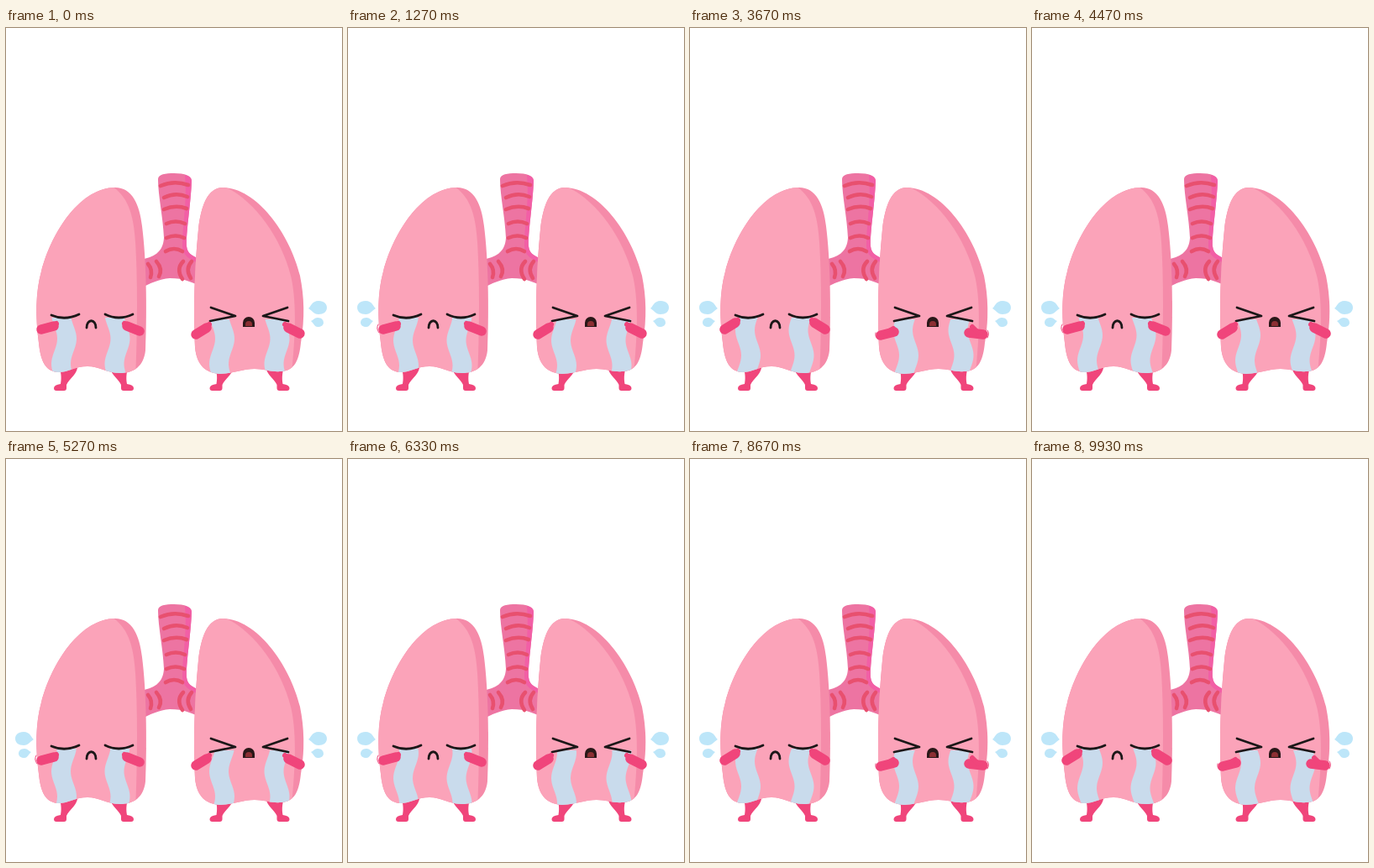
An HTML page that plays this animation: 400 px wide and 480 px high, repeating every 9990 ms.

```html
<!DOCTYPE html>
<html lang="en">
<head>
<meta charset="utf-8">
<title>Crying lungs</title>
<style>
  html, body { margin: 0; width: 100%; height: 100%; overflow: hidden; background: #fff; }
  svg { display: block; width: 100vw; height: 100vh; }
  .line { fill: none; stroke-linecap: round; stroke-linejoin: round; }
  .ink { stroke: #1c1718; stroke-width: 2.8; }
  .ring { stroke: #e8506f; stroke-width: 4.6; }
  .limb { fill: #f0457b; }
  .arm { stroke: #f0457b; stroke-width: 11.5; }
  .thumb { stroke: #f0457b; stroke-width: 6; }
  .trace { stroke: #f0457b; stroke-width: 1; }
  .tear { fill: #c9dbec; }
  .drop { fill: #bde6f9; }
</style>
</head>
<body>
<svg viewBox="0 0 400 480">
  <defs>
    <path id="lungL" d="M130 190C150 190 159 210 162 236C167 276 168 330 166 384C164 403 152 411 136 411C120 411 111 403 97 403C82 403 75 410 62 410C46 409 41 395 39 375C35 345 35 315 42 290C55 240 90 190 130 190Z"/>
    <path id="lungR" d="M258 190C240 190 232 212 229 240C224 290 223 340 225 380C227 402 238 411 255 412C272 411 282 406 296 406C308 406 315 410 328 409C344 408 349 395 351 375C356 345 355 320 350 295C338 245 298 190 258 190Z"/>
    <clipPath id="clipL"><use href="#lungL"/></clipPath>
    <clipPath id="clipR"><use href="#lungR"/></clipPath>
    <path id="leg" class="limb" d="M64 405H85C83 414 75 418 72 425V429Q72 432 69 432H60Q57 432 57 429Q57 425 65 424C66 418 66 413 64 405Z"/>
    <g id="legs"><use href="#leg"/><use href="#leg" transform="matrix(-1 0 0 1 209 0)"/></g>
    <path id="drops" class="drop" d="M360 334C363 332 364 325 372 325C379 325 382 329 382 333C382 338 378 341 372 341C366 341 364 336 360 334ZM363 349C366 348 367 345 371 345C376 345 378 348 378 351C378 354 375 356 371 356C367 356 366 351 363 349Z"/>
  </defs>

  <path fill="#ed74a2" d="M181 180C181 174 190 173 200 173C213 173 221 176 221 182C220 210 214 245 215 260C216 270 224 272 232 276V308C222 303 212 298 195 298C182 299 172 304 160 310V276C175 273 187 268 188 250C187 225 181 200 181 180Z"/>
  <path fill="#f25fa6" d="M213 175Q221 177 221 182C220 210 214 245 215 260C216 270 224 272 232 276V281C216 275 210 270 210 258C210 235 216 205 213 175Z"/>
  <path class="line ring" d="M184 188Q200 181 217 187M188 202Q202 195 216 201M188 216Q202 210 215 215M191 233Q202 228 213 233M191 250Q202 245 212 250M190 266Q200 260 210 266M169 281Q175 288 172 297M179 278Q187 287 182 296M211 278Q202 287 210 299M221 278Q213 287 220 298"/>

  <use href="#legs"/>
  <use href="#legs" x="185.5"/>

  <use href="#lungL" fill="#f58ba9"/>
  <path clip-path="url(#clipL)" fill="#fba3b9" d="M120 185C145 197 152 222 154 255Q158 320 154 420H20V185Z"/>
  <use href="#lungR" fill="#f58ba9"/>
  <path clip-path="url(#clipR)" fill="#fba3b9" d="M250 185C290 197 326 245 339 295C346 325 345 365 339 420H210V185Z"/>

  <g id="tearsL" clip-path="url(#clipL)"></g>
  <g id="tearsR" clip-path="url(#clipR)"></g>

  <path class="line ink" d="M54 342Q70 349 87 341M118 341Q134 349 151 341M96 357C96 346 107 346 107 357M244 333L273 343L243 349M335 333L306 343L336 349"/>
  <path fill="#2a1718" d="M282 356V351A7 7 0 0 1 296 351V356Z"/>
  <path fill="#8c2f33" d="M285 355V353A4 4 0 0 1 293 353V355Z"/>

  <g id="poseA">
    <path class="line arm" d="M42 359L57 355M159 361L144 355M226 365L239 357M350 364L336 357"/>
    <path class="line thumb" d="M50 357L60 352M152 358L141 352M232 360L242 353M343 360L332 353"/>
  </g>
  <g id="poseB">
    <path class="line arm" d="M41 359L54 351M161 359L148 351M227 366L243 362M349 365L332 363"/>
    <path class="line thumb" d="M48 355L57 348M154 355L145 348M233 363L242 358M343 363L336 356"/>
  </g>
  <path id="traceA" class="line trace" d="M36 353Q33 358 37 363"/>
  <path id="traceB" class="line trace" d="M221 363Q220 370 225 371M354 360Q357 364 354 369"/>

  <use href="#drops"/>
  <use id="dropsL" href="#drops" transform="matrix(-1 0 0 1 393 0)"/>
</svg>
<script>
const LOOP = 9990, STEP = 66.6, FPS = 15;
const byId = id => document.getElementById(id);
const show = (id, on) => byId(id).style.display = on ? '' : 'none';

function addTear(group, x, top) {
  const path = document.createElementNS('http://www.w3.org/2000/svg', 'path');
  path.setAttribute('class', 'tear');
  byId(group).append(path);
  return { path, x, top };
}

const tears = [
  addTear('tearsL', 69, 345), addTear('tearsL', 132.5, 345),
  addTear('tearsR', 257, 347), addTear('tearsR', 322.5, 347)
];

// A ribbon whose sway travels downwards twice a second
function drawTear({ path, x, top }, seconds) {
  const left = [], right = [];
  for (let y = top; y <= 416; y += 3) {
    const mid = x + 3.5 * Math.cos(2 * Math.PI * ((y - 370) / 60 - 2 * seconds));
    left.push(`${(mid - 11.5).toFixed(2)} ${y}`);
    right.unshift(`${(mid + 11.5).toFixed(2)} ${y}`);
  }
  path.setAttribute('d', `M${left.concat(right).join('L')}Z`);
}

function draw(now) {
  const step = Math.floor((now % LOOP + 4) / STEP) % 150;
  const seconds = step / FPS;
  const up = seconds % 1 >= 0.5;
  tears.forEach(tear => drawTear(tear, seconds));
  show('poseA', !up);
  show('poseB', up);
  show('traceA', !up && step > 7);
  show('traceB', up);
  show('dropsL', step > 7);
  requestAnimationFrame(() => draw(performance.now() - start));
}

const start = performance.now();
draw(0);
</script>
</body>
</html>
```
